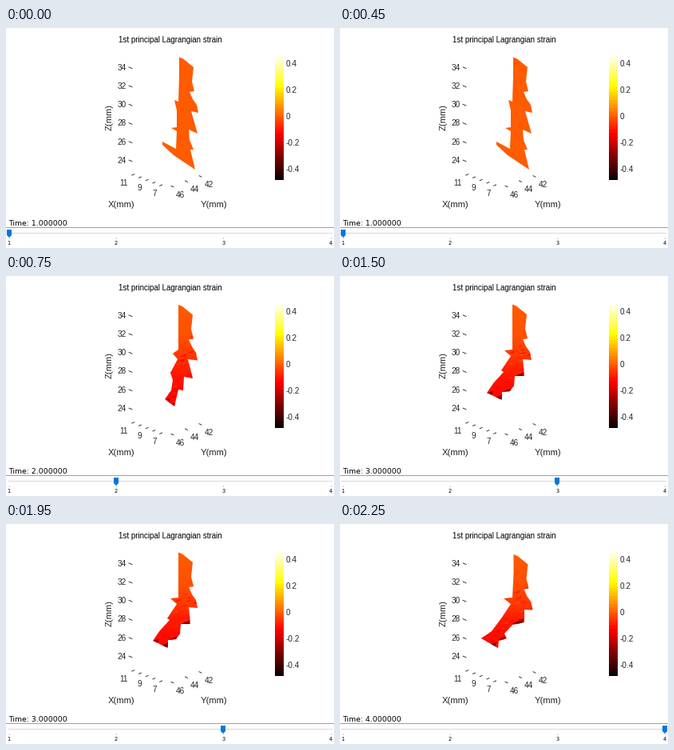
Write a matplotlib script that moves like this. It is 411 px wide and 275 px high and loops after 3000 ms.

```python
import numpy as np
import matplotlib.pyplot as plt
from matplotlib.animation import FuncAnimation
from matplotlib.patches import Polygon, Rectangle

W, H, DPI = 411, 275, 64
PT = 72 / DPI
INK = "#262626"
STEPS = 4
LIMIT = 0.48

fig = plt.figure(figsize=(W / DPI, H / DPI), dpi=DPI, facecolor="white")
ax = fig.add_axes([0, 0, 1, 1])
ax.set_axis_off()
hot = plt.get_cmap("hot")


def strain_color(v):
    return hot((v + LIMIT) / (2 * LIMIT))


def label(x, y, s, px=10, ha="center", color=INK, font="Liberation Sans"):
    """Text whose capitals are vertically centred on y."""
    return ax.text(x, y + 0.36 * px, s, fontsize=px * PT, ha=ha, va="baseline",
                   color=color, family=font)


def dash(x, y, dx, dy):
    ax.plot([x - dx, x + dx], [y - dy, y + dy], color=INK, lw=0.9 * PT)


def box(x, y, w, h, color):
    ax.add_patch(Rectangle((x, y), w, h, fc=color, lw=0, antialiased=False))


def draw_axes():
    label(206, 14.7, "1st principal Lagrangian strain", 9.75, color="black")
    for i in range(6):
        y = 49 + 23.25 * i
        label(145, y, str(34 - 2 * i))
        dash(156, y + 0.7, 1.9, 0.8)
    for i in range(3):
        label(148 + 19 * i, 193 + 6.5 * i, str(11 - 2 * i))
        label(218.5 + 18 * i, 208 - 6.5 * i, str(46 - 2 * i))
        dash(208.5 + 17.5 * i, 198 - 6.3 * i, 1.5, 0.7)
    for i in range(5):
        dash(159.3 + 8.7 * i, 183.4 + 3.3 * i, 1.5, -0.6)
    label(145, 220, "X(mm)", 11.2)
    label(261, 220, "Y(mm)", 11.2)
    ax.text(129.5, 111, "Z(mm)", fontsize=11.2 * PT, rotation=90, ha="center",
            va="center", color=INK, family="Liberation Sans")


def draw_colorbar():
    ramp = np.linspace(1, 0, 64)[:, None]
    ax.imshow(ramp, cmap=hot, extent=(337, 348, 190, 32), aspect="auto",
              interpolation="nearest")
    for i in range(5):
        label(351, 44 + 33 * i, f"{(2 - i) / 5:g}", ha="left")


def slider_x(step):
    return 3.5 + 134.4 * step


def draw_slider():
    box(0, 249, W, 1, "#a0a0a0")
    box(2, 256, 407, 1, "#d6d6d6")
    for i in range(STEPS):
        x = slider_x(i)
        box(round(x), 262, 1, 2, "#c4c4c4")
        label(x + 0.2, 268.8, str(i + 1), 6.6, color="black", font="DejaVu Sans")


# The upper part only shifts; the lower part bends, clockwise from the right
UPPER = [(217, 60), (217, 36.5), (222, 38.5), (235, 49), (233, 67), (236, 79),
         (230, 80), (234, 89), (239, 96), (241, 106)]
SHIFT = [(0, 0), (-1, -0.5), (-1, -1), (0.5, 1.5)]
REST = [(232, 104), (240, 132), (229, 127), (230, 140), (235, 152), (231, 152),
        (237, 177), (210, 159), (196, 146), (196, 142), (213, 151), (214, 129),
        (207, 125), (214, 124), (214, 103), (211, 90)]
BENT = [(228, 104), (234, 128), (223, 126), (222, 143), (216, 142), (211, 163),
        (199, 154), (207, 143), (209, 130), (206, 121), (215, 104), (209, 97)]
MORE = [(229, 104), (231, 125), (219, 125), (218, 137), (213, 144), (203, 145),
        (203, 155), (184, 146), (193, 133), (205, 120), (202, 118), (214, 100),
        (206, 93)]
MOST = [(231, 107), (231, 123), (216, 126), (206, 137), (209, 143), (199, 146),
        (198, 155), (177, 143), (190, 134), (202, 118), (214, 100), (205, 93)]
LOWER = [REST, BENT, MORE, MOST]

# Strongly compressed spots per step: x, y, half length
SPOTS = [
    [],
    [(203, 154, 3), (210, 160, 3)],
    [(198, 151, 6), (188, 145, 4), (225, 123, 6), (209, 143, 6)],
    [(223, 122, 8), (191, 150, 6), (203, 143, 5)],
]


def draw_mesh(step):
    upper = np.array(UPPER) + SHIFT[step]
    outline = np.vstack([upper, LOWER[step], [(216, 92)]])
    clip = Polygon(outline, fc="none", ec="none")
    ax.add_patch(clip)
    parts = []

    def keep(artist):
        artist.set_clip_path(clip)
        parts.append(artist)

    def sliver(x, y, r, v):
        pts = [(x - r, y + 0.35 * r), (x + r, y - 0.5 * r), (x + 0.5 * r, y + 0.3 * r)]
        keep(ax.add_patch(Polygon(pts, fc=strain_color(v), lw=0)))

    ys = np.arange(34, 180)
    bent = min(step, 1)
    strain = bent * np.interp(ys, [36, 75, 100, 118, 140],
                              [0, -0.015, -0.05, -0.09, -0.115])
    keep(ax.imshow(strain[:, None], cmap=hot, vmin=-LIMIT, vmax=LIMIT,
                   extent=(170, 250, 180, 34), aspect="auto", interpolation="bilinear"))
    rng = np.random.default_rng(step)
    for _ in range(46 * bent):
        y = rng.uniform(72, 160)
        near = outline[np.abs(outline[:, 1] - y) < 9, 0]
        if len(near) < 2:
            continue
        x = rng.uniform(near.min(), near.max())
        base = np.interp(y, ys, strain)
        sliver(x, y, rng.uniform(2, 5), base + rng.uniform(-0.07, 0.05))
    for x, y, r in SPOTS[step]:
        sliver(x, y, r, -0.3)
        sliver(x + 1, y + 2, 0.7 * r, -0.37)
    return parts


draw_axes()
draw_colorbar()
draw_slider()
meshes = [draw_mesh(i) for i in range(STEPS)]
clock = label(3.5, 243.7, "", 9.4, ha="left", color="black", font="DejaVu Sans")
thumb = ax.add_patch(Polygon([(0, 0)], fc="#0078d7", lw=0))
ax.set_xlim(0, W)
ax.set_ylim(H, 0)


def update(step):
    for i, parts in enumerate(meshes):
        for part in parts:
            part.set_visible(i == step)
    clock.set_text(f"Time: {step + 1:.6f}")
    x = round(slider_x(step))
    thumb.set_xy([(x - 3, 252), (x + 3, 252), (x + 3, 259), (x, 262), (x - 3, 259)])
    return [thumb, clock]


anim = FuncAnimation(fig, update, frames=STEPS, interval=750, repeat=True,
                     repeat_delay=0, blit=False)
plt.show()
```
